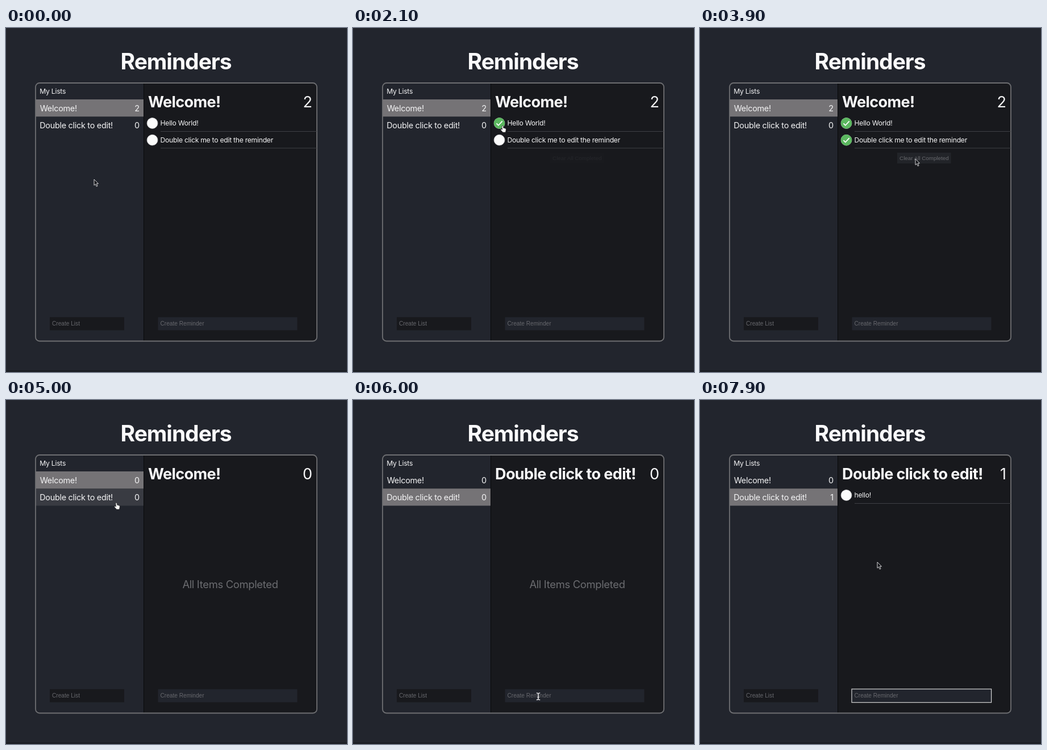
An HTML page for the animation above (8 s loop, 600x607 px).

```html
<!DOCTYPE html>
<html lang="en">
<head>
<meta charset="utf-8">
<title>Reminders</title>
<style>
  html, body { margin: 0; width: 100%; height: 100%; overflow: hidden; background: #22252d; }
  svg { display: block; width: 100%; height: 100%; }
  text { font-family: Inter, "Open Sans", sans-serif; fill: #f4f4f5; letter-spacing: -.022em; }
  .head { font-size: 39px; font-weight: 700; letter-spacing: -.027em; fill: #fafafb; text-anchor: middle; }
  .title { font-size: 27px; font-weight: 700; fill: #fafafb; }
  .total { font-size: 27px; letter-spacing: 0; text-anchor: end; }
  .list { font-size: 14.4px; letter-spacing: -.0185em; }
  .count { font-size: 14.4px; letter-spacing: 0; text-anchor: end; }
  .item { font-size: 12.2px; }
  .empty { font-size: 18.4px; letter-spacing: -.0175em; fill: #6b6c70; text-anchor: middle; }
  .field { font: 10.13px "Liberation Sans", Arial, sans-serif; letter-spacing: 0; fill: #67686d; }
  .clear { font-size: 9.8px; text-anchor: middle; }
</style>
</head>
<body>
<svg viewBox="0 0 600 607" preserveAspectRatio="none">
  <defs>
    <clipPath id="frame"><rect x="52" y="97" width="495" height="455" rx="7"/></clipPath>
    <g id="box"><circle r="9.4" fill="#fbfbfb" stroke="#d5d5d7" stroke-width=".7"/></g>
    <g id="tick">
      <circle r="9.7" fill="#5bb85f"/>
      <path d="M-5 .4L-1.7 3.8 5.2-3.6" fill="none" stroke="#fff" stroke-width="1.7"/>
    </g>
    <path id="rule" d="M272 0H547" stroke="#3f4045"/>
  </defs>

  <rect width="600" height="607" fill="#22252d"/>
  <rect y="604" width="600" height="3" fill="#1b1e25"/>
  <text class="head" x="299" y="72.8">Reminders</text>

  <g clip-path="url(#frame)">
    <rect x="243" y="97" width="304" height="456" fill="#18191d"/>
    <rect id="row1" x="52" y="126" width="190" height="30.3" fill="#757376"/>
    <rect id="row2" x="52" y="156.3" width="190" height="30.2" fill="#757376"/>
    <path d="M242.5 97V553" stroke="#08090b"/>
  </g>
  <rect x="52" y="97" width="495" height="455.5" rx="7" fill="none" stroke="#6e6f72" stroke-width="1.8"/>

  <text class="item" x="59.3" y="116.3">My Lists</text>
  <text class="list" x="59.7" y="146.7">Welcome!</text>
  <text class="list" x="59.2" y="177.1">Double click to edit!</text>
  <text class="count" id="count1" x="235" y="146.7"></text>
  <text class="count" id="count2" x="235" y="177.1"></text>

  <text class="title" id="title" x="250" y="139.8"></text>
  <text class="total" id="total" x="539" y="139.8"></text>

  <g id="first">
    <use href="#box" x="257.5" y="168"/>
    <use href="#tick" id="tick1" x="257.5" y="168"/>
    <text class="item" id="label" x="271.5" y="172.4"></text>
    <use href="#rule" y="182.5"/>
  </g>
  <g id="second">
    <use href="#box" x="257.5" y="197.7"/>
    <use href="#tick" id="tick2" x="257.5" y="197.7"/>
    <text class="item" x="271.5" y="202.1">Double click me to edit the reminder</text>
    <use href="#rule" y="212"/>
  </g>
  <g id="clear">
    <rect x="347" y="220" width="94.5" height="19" fill="#222429"/>
    <text class="field clear" x="394.4" y="233">Clear All Completed</text>
  </g>
  <text class="empty" id="empty" x="394.5" y="331.6">All Items Completed</text>

  <rect x="77" y="510.3" width="131" height="23" fill="#18191d"/>
  <text class="field" x="81" y="525">Create List</text>
  <rect x="267.5" y="510.3" width="245" height="23" fill="#22252d"/>
  <rect id="focus" x="267" y="510" width="245.6" height="23.7" fill="none" stroke="#d6d6d8" stroke-width="1.2"/>
  <text class="field" id="hint" x="271.5" y="525">Create Reminder</text>
  <text class="field" id="typed" x="271.5" y="525" style="fill:#f4f4f5"></text>
  <path id="caret" d="M0 516V527" stroke="#f4f4f5" stroke-width=".9"/>
  <g id="add">
    <circle cx="525.4" cy="523.6" r="9.8" fill="#0f5ce0"/>
    <path d="M522.4 523.6h6M525.4 520.6v6" stroke="#d5e2fb" stroke-width=".9"/>
  </g>

  <g id="cursor">
    <path id="arrow" d="M0 0V10.6L2.4 8.4 4.2 12.6 6 11.8 4.3 7.7H7.5Z" fill="#15161a" stroke="#dedee0" stroke-width=".95"/>
    <path id="hand" d="M-1.1 1Q0-.7 1.1 1L1.6 4.2 5.2 5.2Q6.6 5.8 6.2 8L5.4 12H.6L-3.2 7.7Q-3.3 6.2-1.6 6.4L-.5 7.3Z" fill="#f6f6f6" stroke="#222" stroke-width=".6"/>
    <g id="beam" fill="none">
      <path d="M-3.2-6Q-.6-6 0-4.6 .6-6 3.2-6M0-4.6V4.6M-3.2 6Q-.6 6 0 4.6 .6 6 3.2 6M-1.8 1.6H1.8" stroke="#dedee0" stroke-width="1.5"/>
    </g>
  </g>
</svg>
<script>
const LOOP = 8000, STEP = 100;
const WORD = "hello!";
const $ = id => document.getElementById(id);

// time, x, y of the pointer's hot spot
const path = [
  [0, 155, 267], [200, 195, 207], [300, 195, 207], [800, 258, 174],
  [1300, 258, 174], [1400, 263, 172], [2100, 263, 172], [2600, 260, 203],
  [3100, 260, 203], [3700, 379, 231], [4300, 379, 231], [4600, 282, 180],
  [4700, 282, 180], [5000, 194, 181], [5300, 140, 175], [5500, 140, 175],
  [6000, 326, 523], [7400, 326, 523], [7900, 312, 286]
];

const ramp = (t, a, b) => Math.min(1, Math.max(0, (t - a) / (b - a)));
const show = (id, on) => $(id).style.opacity = +on;
const write = (id, s) => { if ($(id).textContent !== String(s)) $(id).textContent = s; };

function pointer(t) {
  let i = path.findIndex(k => k[0] > t);
  if (i < 0) return path[path.length - 1].slice(1);
  const [t0, x0, y0] = path[i - 1], [t1, x1, y1] = path[i];
  const u = ramp(t, t0, t1), e = u * u * (3 - 2 * u);
  return [x0 + (x1 - x0) * e, y0 + (y1 - y0) * e];
}

function shape(t, x, y) {
  const inField = x > 267 && x < 513 && y > 509 && y < 534;
  const onRow = x > 52 && x < 242 && y > 126 && y < 186.5;
  const onBox = t < 4000 && x > 248 && x < 268 && y > 158 && y < 208;
  return inField ? "beam" : onRow || onBox ? "hand" : "arrow";
}

function draw(t) {
  const cleared = t >= 4000, opened = t >= 5300, added = t >= 7300;
  const picked = ramp(t, 5200, 5400);
  const hover = .28 * ramp(t, 4800, 5000);

  show("row1", 1 - picked);
  show("row2", hover + (1 - hover) * picked);
  write("count1", cleared ? 0 : 2);
  write("count2", +added);
  write("title", opened ? "Double click to edit!" : "Welcome!");
  write("total", added ? 1 : cleared ? 0 : 2);

  show("first", !cleared || added);
  write("label", added ? WORD : "Hello World!");
  show("tick1", t >= 1600 && !cleared);
  show("second", !cleared);
  show("tick2", t >= 2800);
  show("clear", cleared ? 0 : ramp(t, 1950, 2900));
  show("empty", cleared && !added);

  const n = t >= 6500 && !added ? Math.min(WORD.length, Math.floor((t - 6400) / 100)) : 0;
  write("typed", WORD.slice(0, n));
  show("hint", !n);
  show("focus", t >= 6100);
  show("caret", t >= 6100 && !added);
  const end = n ? $("typed").getComputedTextLength() : 0;
  $("caret").setAttribute("transform", `translate(${272 + end} 0)`);
  show("add", added ? 1 - ramp(t, 7200, 7500) : ramp(t, 6400, 6700));

  const [x, y] = pointer(t), kind = shape(t, x, y);
  $("cursor").setAttribute("transform", `translate(${x} ${y})`);
  show("cursor", t < 6500 || t >= 7500);
  for (const k of ["arrow", "hand", "beam"]) show(k, k === kind);
}

const start = performance.now();
function tick() {
  const t = (performance.now() - start) % LOOP;
  draw(Math.floor(t / STEP) * STEP);
  requestAnimationFrame(tick);
}
tick();
</script>
</body>
</html>
```
